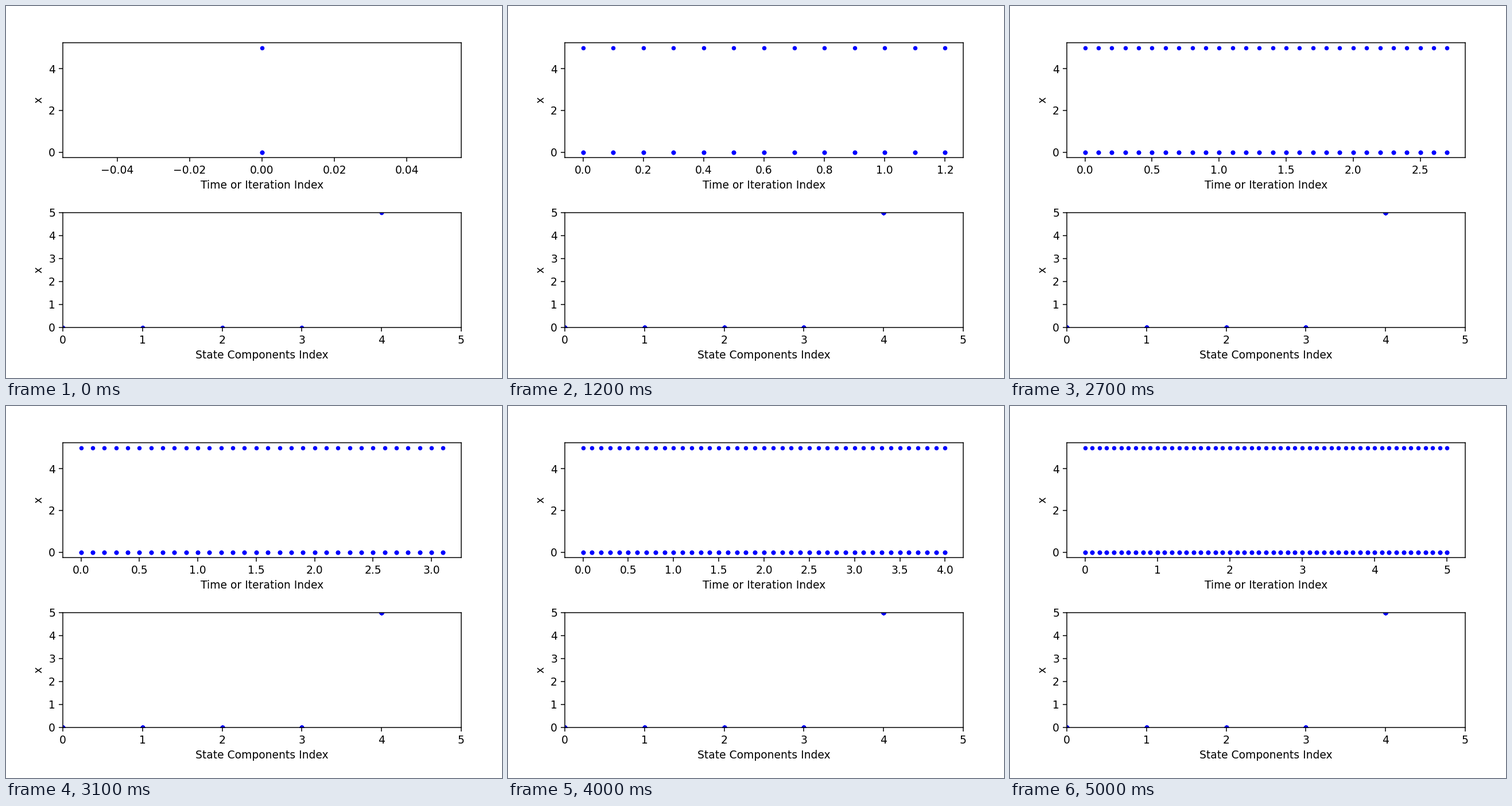
Recreate the animation shown at these times as a matplotlib script. Size 864 by 648 pixels, loop 5100 ms.

```python
import numpy as np
import matplotlib.pyplot as plt
from matplotlib.animation import FuncAnimation

FRAMES = 51
STEP = 0.1
STATE = np.array([0, 0, 0, 0, 5])
INDEX = np.arange(len(STATE))

# The layout is fitted to the bare axes at screen resolution, then drawn at 135 dpi.
fig, (ax_time, ax_state) = plt.subplots(2, 1, figsize=(6.4, 4.8), dpi=100)
fig.tight_layout(pad=3.0)
fig.set_dpi(135)

ax_time.set(xlabel="Time or Iteration Index", ylabel="x")
ax_state.set(xlabel="State Components Index", ylabel="x", xlim=(0, 5), ylim=(0, 5))
history, = ax_time.plot([], [], "b.")
profile, = ax_state.plot([], [], "b.")


def update(i):
    """Show every state up to step i; each step adds its dots to both plots."""
    n = i + 1
    states = np.tile(STATE, n)
    history.set_data(np.repeat(np.arange(n) * STEP, len(STATE)), states)
    profile.set_data(np.tile(INDEX, n), states)
    ax_time.relim()
    ax_time.autoscale_view()
    return history, profile


def reset():
    return update(0)


anim = FuncAnimation(fig, update, frames=FRAMES, init_func=reset,
                     interval=100, repeat=True, repeat_delay=0, blit=False)

plt.show()
```
